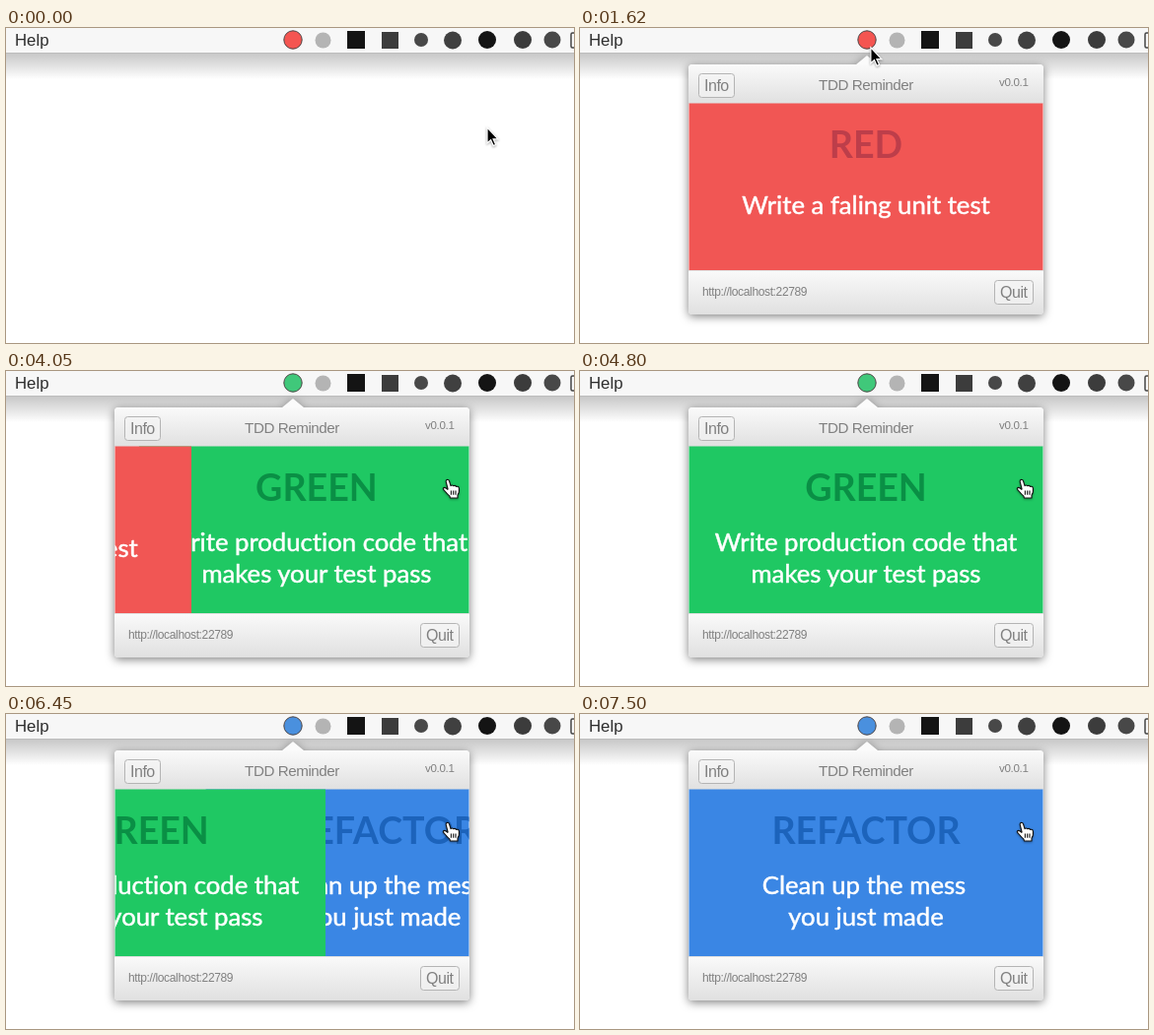
An HTML page for the animation above (8 s loop, 576 px wide and 320 px high).

```html
<!DOCTYPE html>
<html lang="en">
<head>
<meta charset="utf-8">
<title>TDD Reminder</title>
<style>
  html, body { margin: 0; width: 100%; height: 100%; overflow: hidden; background: #fff; }
  svg { display: block; }
  text { font-family: "Liberation Sans", Arial, sans-serif; fill: #808080; }
  .label { letter-spacing: -.03em; }
  .slide text {
    font: 400 25.7px Lato, sans-serif; font-variant-ligatures: none; text-anchor: middle;
    fill: #fff; stroke: #fff; stroke-width: .5;
  }
  .slide .heading { font-size: 37.6px; font-weight: 700; stroke: none; }
  .button { fill: #f6f6f6; fill-opacity: .6; stroke: #b4b4b4; }
  .window { filter: drop-shadow(0 2px 5px rgba(0, 0, 0, .5)); }
  .cursor { filter: drop-shadow(0 1px 1px rgba(0, 0, 0, .35)); }
</style>
</head>
<body>
<svg width="576" height="320" viewBox="0 0 576 320">
  <defs>
    <linearGradient id="barShadow" x2="0" y2="1">
      <stop stop-color="#c6c6c6"/><stop offset=".5" stop-color="#e2e2e2"/><stop offset="1" stop-color="#fff"/>
    </linearGradient>
    <linearGradient id="chrome" x2="0" y2="1">
      <stop stop-color="#fafafa"/><stop offset="1" stop-color="#e0e0e0"/>
    </linearGradient>
  </defs>

  <rect width="576" height="320" fill="#fff"/>
  <rect y="25" width="576" height="27" fill="url(#barShadow)"/>
  <rect width="576" height="25" fill="#f7f7f7"/>
  <rect y="25" width="576" height="1" fill="#bdbdbd"/>
  <text x="9" y="18" style="font-size:16.8px;fill:#2e2e2e">Help</text>

  <rect id="highlight" x="276" width="31" height="25" fill="#2f6fe4"/>
  <circle id="status" cx="291" cy="12" r="9.2" stroke="#4c4444"/>
  <circle cx="321.5" cy="12.5" r="8" fill="#b4b4b4"/>
  <rect x="346" y="3" width="18" height="18" fill="#141414"/>
  <rect x="381" y="4" width="17" height="17" fill="#3c3c3c"/>
  <circle cx="421" cy="12" r="7" fill="#484848"/>
  <circle cx="453" cy="12.5" r="9" fill="#404040"/>
  <circle cx="488" cy="12" r="9" fill="#141414"/>
  <circle cx="524" cy="12" r="9" fill="#3c3c3c"/>
  <circle cx="554" cy="12" r="8.5" fill="#484848"/>
  <rect x="573" y="5" width="20" height="15" rx="1.5" fill="none" stroke="#444" stroke-width="1.5"/>

  <g id="popup">
    <path class="window" d="M114 37H280L291 28L302 37H466Q470 37 470 41V287Q470 291 466 291H114Q110 291 110 287V41Q110 37 114 37Z" fill="#fbfbfb"/>
    <path d="M110 77V41Q110 37 114 37H466Q470 37 470 41V77Z" fill="url(#chrome)"/>
    <path d="M110 246H470V287Q470 291 466 291H114Q110 291 110 287Z" fill="url(#chrome)"/>
    <rect class="button" x="120.5" y="46.5" width="36" height="24" rx="3"/>
    <text class="label" x="126" y="64" font-size="16">Info</text>
    <text class="label" x="290" y="63" font-size="15.2" text-anchor="middle">TDD Reminder</text>
    <text class="label" x="425" y="59" font-size="11.6">v0.0.1</text>
    <text class="label" x="124" y="272" font-size="12">http://localhost:22789</text>
    <rect class="button" x="420.5" y="256.5" width="39" height="24" rx="3"/>
    <text class="label" x="426" y="274" font-size="16">Quit</text>

    <svg x="110.5" y="76.5" width="359" height="169.5" viewBox="110.5 76.5 359 169.5">
      <g class="slide" id="refactor">
        <rect x="110" y="76" width="360" height="170" fill="#3a86e4"/>
        <text class="heading" x="290" y="131.5" style="fill:#1c63bb">REFACTOR</text>
        <text x="288" y="183">Clean up the mess</text>
        <text x="290" y="214.5">you just made</text>
      </g>
      <g class="slide" id="green">
        <rect x="110" y="76" width="360" height="170" fill="#1fc863"/>
        <text class="heading" x="290" y="131.5" style="fill:#0a8f45">GREEN</text>
        <text x="290" y="183">Write production code that</text>
        <text x="290" y="214.5">makes your test pass</text>
      </g>
      <g class="slide" id="red">
        <rect x="110" y="76" width="360" height="170" fill="#f15654"/>
        <text class="heading" x="290" y="131.5" style="fill:#bd3e4a">RED</text>
        <text x="290" y="188.5">Write a faling unit test</text>
      </g>
    </svg>
    <path d="M110 246.5H470" stroke="#bcbcbc" stroke-opacity=".4"/>
  </g>

  <g class="cursor" id="arrow">
    <path d="M0 0V16L3.6 12.7L6.2 18.6L8.7 17.5L6.1 11.8H11Z" fill="#000" stroke="#fff" stroke-width="1.2"/>
  </g>
  <g class="cursor" id="hand">
    <path transform="translate(-7 -1)" d="M6.2 11.5L4.2 3.4Q4 1.4 5.6 1.2Q7 1.2 7.6 3L9 7.6Q10.4 6.4 11.8 7.8Q13.4 6.8 14.6 8.4Q17 7.8 17.4 10Q18 14.6 16 17V20H8.4L8 18.2Q5.6 16.2 4 14L1.6 11.4Q.8 9.8 2.4 9.4Q4 9.4 6.2 11.5M9.4 12.6V16.8M11.7 12.6V16.8M14 12.6V16.8" fill="#fff" stroke="#111" stroke-width="1.1" stroke-linejoin="round"/>
  </g>
</svg>

<script>
const LOOP = 8000, SLIDE_TIME = 700, WIDTH = 360;
const $ = id => document.getElementById(id);
const show = (id, on) => $(id).setAttribute('visibility', on ? 'visible' : 'hidden');
const move = (id, x, y = 0) => $(id).setAttribute('transform', `translate(${x} ${y})`);
const progress = (t, start, length) => Math.min(1, Math.max(0, (t - start) / length));

function bezier(x1, y1, x2, y2) {
  const at = (a, b, s) => 3 * a * s * (1 - s) ** 2 + 3 * b * s * s * (1 - s) + s ** 3;
  return x => {
    if (x <= 0 || x >= 1) return x;
    let low = 0, high = 1;
    for (let i = 0; i < 24; i++) {
      const mid = (low + high) / 2;
      if (at(x1, x2, mid) < x) low = mid; else high = mid;
    }
    return at(y1, y2, low);
  };
}
const ease = bezier(.25, .1, .25, 1);
const easeInOut = bezier(.42, 0, .58, 1);

// The leaving slide lies on top and eases differently from the entering one.
const leaving = (t, start) => -Math.floor(WIDTH * easeInOut(progress(t, start, SLIDE_TIME)));
const entering = (t, start) => WIDTH * (1 - ease(progress(t, start, SLIDE_TIME)));

const START = [488, 101], ICON = [293.5, 19], REST = [449, 110];
function pointer(t) {
  const [from, to, p] = t < 1500
    ? [START, ICON, progress(t, 150, 690)]
    : [ICON, REST, progress(t, 1580, 610)];
  const k = easeInOut(p);
  return from.map((v, i) => v + (to[i] - v) * k);
}

function draw(t) {
  const first = 3576, second = 6139;
  move('red', leaving(t, first));
  move('green', entering(t, first) + leaving(t, second));
  move('refactor', entering(t, second));
  $('status').setAttribute('fill', t < 3600 ? '#f45551' : t < 6150 ? '#40c87a' : '#4a90de');
  show('highlight', t >= 930 && t < 990);
  show('popup', t >= 960);

  const [x, y] = pointer(t);
  const overWindow = t > 1580 && y > 28;
  show('arrow', !overWindow);
  show('hand', overWindow);
  move('arrow', x, y);
  move('hand', x, y);
}

const origin = performance.now();
function tick() {
  draw((performance.now() - origin) % LOOP);
  requestAnimationFrame(tick);
}
tick();
</script>
</body>
</html>
```
